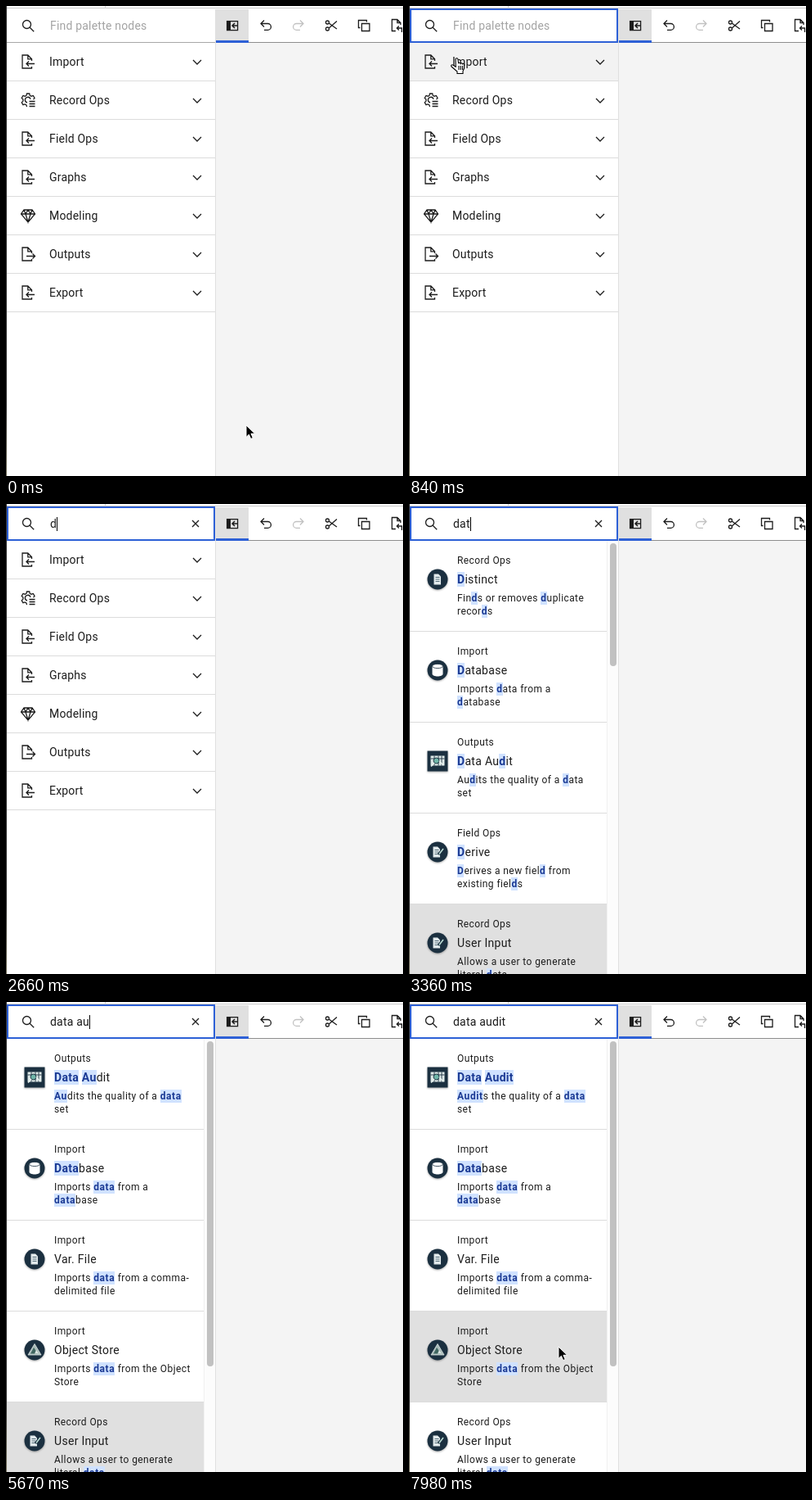
These frames come from a looping animation (486 px wide and 574 px high, 8000 ms). An HTML page:

```html
<!DOCTYPE html>
<html lang="en">
<head>
<meta charset="utf-8">
<title>Node palette search</title>
<style>
  html, body { margin: 0; width: 100%; height: 100%; overflow: hidden; background: #f4f4f4; }
  #stage { position: relative; width: 486px; height: 574px; overflow: hidden;
    font: 14px/20px Roboto, sans-serif; letter-spacing: .2px; color: #1c1c1c; }
  #stage div, #stage svg { position: absolute; box-sizing: border-box; }
  svg { left: 0; top: 0; overflow: visible; }
  .line { fill: none; stroke: #1c1c1c; stroke-width: 1.3; }
  #panel { left: 1px; top: 45px; width: 255px; height: 529px; background: #fff; overflow: hidden; }
  .cat { left: 0; width: 255px; height: 47px; border-bottom: 1px solid #dcdcdc; }
  .cat span { position: absolute; left: 52px; top: 13px; }
  .cat.hover { background: #f2f2f2; }
  .hit { left: 0; width: 241px; height: 111px; border-bottom: 1px solid #dcdcdc; white-space: nowrap; }
  .hit.hover { background: #e0e0e0; }
  .hit div { left: 58px; }
  .group { top: 16px; font-size: 12px; line-height: 16px; letter-spacing: .4px; }
  .name { top: 37px; letter-spacing: .3px; }
  .desc { top: 62px; font-size: 12px; line-height: 16px; letter-spacing: .42px; }
  mark { background: #d0e2ff; color: #1b3a94; font-weight: 600; padding: 1px 0; }
  .desc mark { letter-spacing: .6px; }
  #bar { left: 241px; top: 0; width: 14px; height: 529px; background: #fcfcfc; border-left: 1px solid #f0f0f0; }
  #thumb { left: 3px; top: 3px; width: 8px; border-radius: 4px; background: #c1c1c1; }
  #search { left: 1px; top: 3px; width: 255px; height: 42px; background: #fff; border-bottom: 1px solid #a8a8a8; }
  #search.focus { border: 2px solid #2d60d6; }
  #field { left: 54px; top: 14px; white-space: pre; }
  #hint { left: 54px; top: 14px; color: #a3a3a3; }
  #caret { display: inline-block; width: 1px; height: 17px; margin-right: -1px; background: #000; vertical-align: -4px; }
</style>
</head>
<body>
<div id="stage">
  <div style="left:0;top:0;width:486px;height:45px;background:#fff;border-bottom:1px solid #8d8d8d"></div>
  <div style="left:0;top:0;width:486px;height:3px;background:#fff;border-bottom:1px solid #c9c9c9"></div>
  <div style="left:121px;top:0;width:1px;height:3px;background:#d0d0d0"></div>
  <div style="left:257px;top:4px;width:40px;height:41px;background:#e0e0e0;border-bottom:3px solid #2d60d6"></div>
  <svg class="line" width="486" height="45">
    <rect x="270.6" y="18.6" width="13" height="11"/>
    <path d="M270 18h5v12h-5z" fill="#1c1c1c" stroke="none"/>
    <path d="M283 24h-6m3-3-3 3 3 3" stroke-width="1.5"/>
    <path id="undo" d="M316 17.500l-4 4 4 4M312.500 21.500h8a3.900 3.900 0 0 1 0 7.800h-4.500"/>
    <use href="#undo" transform="translate(676) scale(-1 1)" opacity=".27"/>
    <circle cx="393.500" cy="20" r="2"/><circle cx="393.500" cy="28" r="2"/>
    <path d="M395.300 21l9.700 7M395.300 27l9.700-8.500"/>
    <path d="M433.500 26.500h-2v-9h10v2M435.500 21.500h9.500v9h-9.500z"/>
    <path d="M477 30.500h-4.500v-14h6.500l4 4v2.500M479 16.500v4h4M484.500 32v-5h-6m2.500-2.500-2.500 2.500 2.500 2.500"/>
  </svg>
  <div id="panel">
    <div id="cats"></div>
    <div id="hits"></div>
    <div id="bar"><div id="thumb"></div></div>
  </div>
  <div style="left:256px;top:4px;width:1px;height:570px;background:#e0e0e0"></div>
  <div id="search"></div>
  <svg class="line" width="256" height="45">
    <circle cx="25.500" cy="22.500" r="5"/><path d="M29.200 26.200l5 5"/>
    <path id="clear" d="M228 20l8 8m0-8-8 8"/>
  </svg>
  <div id="hint">Find palette nodes</div>
  <div id="field"><span id="query"></span><span id="caret"></span></div>
  <div style="left:0;top:0;width:1px;height:574px;background:linear-gradient(#333 85%,#77735f)"></div>
  <svg id="pointer" width="20" height="22">
    <path id="arrow" d="M0 0v14.500l3.400-3.200 2.300 5.300 2.600-1.100-2.300-5.200h4.700z" fill="#000" stroke="#fff"/>
    <path id="hand" d="M3 1.200c0-2 2.800-2 3 0l.6 5c.3-1.300 2.400-1.200 2.600.2.500-1 2.200-.8 2.400.4.700-.8 2-.4 2 .8v4.500L12 15.500v3H5v-2.500L-2 10c-1.200-1.400.6-3 2-1.800l3.300 2zM7 9v5m2.300-5v5m2.200-5v5" transform="translate(-1 -1)" fill="#fff" stroke="#000" stroke-width="1.100"/>
    <path id="beam" d="M-2-7q2 0 2 2v10q0 2-2 2M2-7q-2 0-2 2v10q0 2 2 2" fill="none" stroke="#222"/>
  </svg>
</div>
<script>
const $ = id => document.getElementById(id);
const TICK = 70, LOOP = 8000;

const page = 'M14.500 9V6.800L9.800 2H3v16h11.500v-2M9.800 2v4.800h4.700';
const icons = {
  in: `<path d="${page}M18 12.500H8m3-3-3 3 3 3"/>`,
  out: `<path d="${page}M8 12.500h10.500m-3-3 3 3-3 3"/>`,
  gear: '<path d="M8.500 18.200l-.6-2.300-1.700-.9-2.300.7-1.700-2.900 1.700-1.700v-2L2.200 7.400l1.700-2.900 2.300.7 1.700-.9.600-2.300h3.200l.6 2.300 1.700.9 2.300-.7L18 7.400l-1.500 1.700M9 13a3.400 3.400 0 1 1 4-4.300M11.500 11.500h7m-7 3h7m-7 3h7"/>',
  gem: '<path d="M5 3h10l3.500 5L10 18 1.500 8zM1.500 8h17M5 3l2 5 3 10 3-10 2-5M7 8l3-5 3 5"/>'
};
const cats = [['Import', 'in'], ['Record Ops', 'gear'], ['Field Ops', 'in'], ['Graphs', 'in'],
  ['Modeling', 'gem'], ['Outputs', 'out'], ['Export', 'in']];

const disc = '<circle r="12.500" fill="#1b3040"/>';
const paper = '<path d="M-4.500-6.500h5.500l3 3v10h-8.500z" fill="#e2eaec"/><path d="M-2.500-2.500h5m-5 2.500h5m-5 2.500h5" stroke="#47606e" stroke-width=".9"/>';
const badges = {
  db: disc + '<path d="M-6.500-5v9.500c0 4 13 4 13 0V-5" fill="#fff"/><ellipse cy="-5" rx="6.500" ry="2.600" fill="#fff" stroke="#1b3040" stroke-width=".8"/>',
  audit: '<path d="M-12.500-12.500h25v25h-25z" fill="#1b3040"/><path d="M-8.500-6.500h17v12h-17z" fill="#dfeae8"/><path d="M-8.500-3h17M-4-6.500v12M1-6.500v12M5-6.500v12" stroke="#1b3040" stroke-width=".9"/><circle cx="-1.500" cy="-.5" r="3.500" fill="#6fb5a8" stroke="#1b3040"/><path d="M-4 2l-4 4.500M2 0l5 5" stroke="#e8f2f0" stroke-width="1.600"/>',
  file: disc + paper,
  store: disc + '<path d="M0-7.500 8 6H-8z" fill="#a9bbb8" stroke="#dbe5e2" stroke-width=".8"/><path d="M-1-3 4 4.500h-9z" fill="#3f6660"/><path d="M2 0l3 4.500H0z" fill="#dbe5e2"/>',
  input: disc + '<g transform="translate(-1)">' + paper + '</g><path d="M1 3l6-7" stroke="#1b3040" stroke-width="3"/><path d="M2 2.500l5-6.500" stroke="#bfe0d8" stroke-width="1.500"/>'
};
const nodes = {
  database: ['db', 'Import', 'Database', 'Imports data from a|database'],
  audit: ['audit', 'Outputs', 'Data Audit', 'Audits the quality of a data|set'],
  file: ['file', 'Import', 'Var. File', 'Imports data from a comma-|delimited file'],
  store: ['store', 'Import', 'Object Store', 'Imports data from the Object|Store'],
  input: ['input', 'Record Ops', 'User Input', 'Allows a user to generate|literal data'],
  distinct: ['file', 'Record Ops', 'Distinct', 'Finds or removes duplicate|records'],
  derive: ['input', 'Field Ops', 'Derive', 'Derives a new field from|existing fields']
};

// [time, query]
const typed = [[0, ''], [2450, 'd'], [3010, 'da'], [3360, 'dat'], [3570, 'data'], [4340, 'data '],
  [5180, 'data a'], [5390, 'data au'], [5950, 'data aud'], [6720, 'data audi'], [7000, 'data audit']];
// [time, highlighted words, node order, thumb length]
const byData = 'database audit file store input', byAudit = 'audit database file store input';
const found = [[0, ''], [2800, 'd', 'distinct database audit derive input', 150], [3850, 'data', byData, 397],
  [5670, 'data au', byAudit, 397], [6160, 'data aud', byAudit, 397], [7210, 'data audit', byAudit, 397]];
// [time, x, y]
const path = [[0, 294, 512], [70, 312, 548], [140, 300, 480], [210, 220, 280], [280, 110, 70], [350, 68, 27],
  [700, 62, 24], [770, 59, 44], [840, 55, 65], [1050, 80, 150], [1330, 130, 340], [1750, 185, 556],
  [7490, 185, 556], [7630, 188, 525], [7840, 185, 450], [7980, 183, 421]];
const FOCUS = 320;

const last = (steps, t) => steps.filter(s => s[0] <= t).pop();

function pointerAt(t) {
  const i = path.findIndex(p => p[0] > t);
  if (i < 0) return path[path.length - 1].slice(1);
  const [t0, x0, y0] = path[i - 1], [t1, x1, y1] = path[i], k = (t - t0) / (t1 - t0);
  return [x0 + (x1 - x0) * k, y0 + (y1 - y0) * k];
}

function highlight(text, words) {
  return text.replace(new RegExp(words.split(' ').join('|'), 'gi'), '<mark>$&</mark>');
}

function hitHtml(key, i, words) {
  const [badge, group, name, desc] = nodes[key];
  const lines = desc.split('|').map(s => highlight(s, words)).join('<br>');
  return `<div class="hit" style="top:${i * 111}px">
    <svg width="1" height="1" style="left:33.500px;top:46.500px;filter:drop-shadow(0 1px 1px #0005)">${badges[badge]}</svg>
    <div class="group">${group}</div><div class="name">${highlight(name, words)}</div><div class="desc">${lines}</div></div>`;
}

$('cats').innerHTML = cats.map(([name, icon], i) => `<div class="cat" style="top:${i * 47}px">
  <svg class="line" width="20" height="20" style="left:16px;top:13px">${icons[icon]}</svg><span>${name}</span>
  <svg class="line" width="12" height="8" style="left:227px;top:20px"><path d="M1 1l5 5 5-5"/></svg></div>`).join('');

const show = (id, on) => { $(id).style.visibility = on ? 'visible' : 'hidden'; };
const hover = (cls, n) => document.querySelectorAll(cls).forEach((el, i) => el.classList.toggle('hover', i === n));
let shown = null;

function render(t) {
  const [typedAt, query] = last(typed, t), result = last(found, t);
  const [, words, order, thumb] = result;
  const [x, y] = pointerAt(t);
  const focused = t >= FOCUS, listing = !!words, inPanel = x < 256;

  if (result !== shown) {
    shown = result;
    $('cats').style.display = listing ? 'none' : '';
    $('hits').innerHTML = listing ? order.split(' ').map((k, i) => hitHtml(k, i, words)).join('') : '';
    $('thumb').style.height = (thumb || 0) + 'px';
  }
  show('bar', listing);
  hover('.cat', inPanel && y >= 45 ? Math.floor((y - 45) / 47) : -1);
  hover('.hit', Math.floor((y - 45) / 111));

  $('search').className = focused ? 'focus' : '';
  $('query').textContent = query;
  show('hint', !query);
  show('clear', query);
  show('caret', focused && Math.floor((t - (typedAt || FOCUS)) / 500) % 2 === 0);

  // The pointer hides while typing.
  const visible = !query || t >= 7490;
  const kind = inPanel && y < 45 ? 'beam' : inPanel && y < 374 && !listing ? 'hand' : 'arrow';
  for (const id of ['arrow', 'hand', 'beam']) show(id, visible && id === kind);
  $('pointer').style.transform = `translate(${Math.round(x)}px,${Math.round(y)}px)`;
}

let tick = -1;
function frame() {
  const n = Math.floor(performance.now() % LOOP / TICK);
  if (n !== tick) render((tick = n) * TICK);
  requestAnimationFrame(frame);
}
frame();
</script>
</body>
</html>
```
